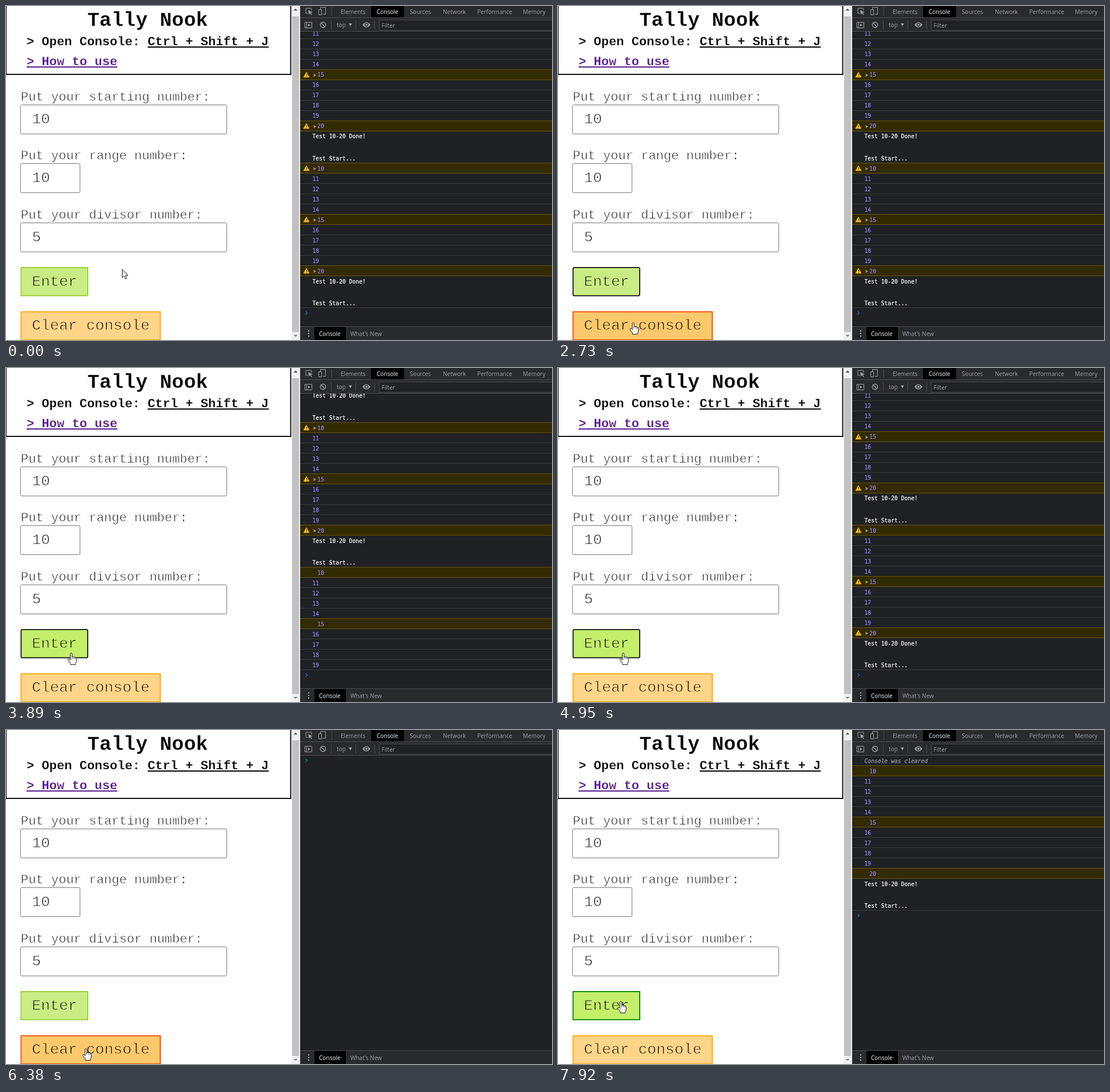
Write an HTML page that moves like this. It is 956 px wide and 586 px high and loops after 7990 ms.

```html
<!DOCTYPE html>
<html lang="en">
<head>
<meta charset="utf-8">
<title>Number test page</title>
<style>
  html, body { margin: 0; width: 100%; height: 100%; overflow: hidden; background: #fff; }
  svg { display: block; }
  text { white-space: pre; }
  .page { font-family: "Liberation Mono", "Courier New", monospace; }
  .ui { font: 10.1px "Open Sans", sans-serif; }
  .log { font: 9.7px "DejaVu Sans Mono", monospace; }
  rect { shape-rendering: crispEdges; }
  .round { shape-rendering: auto; }
</style>
</head>
<body>
<svg id="stage" width="956" height="586" viewBox="0 0 956 586">
  <clipPath id="view"><rect x="515" y="45" width="441" height="517"/></clipPath>
  <g id="fixed"></g>
  <g id="buttons" class="page"></g>
  <g id="console" class="log" clip-path="url(#view)"></g>
  <g id="pointer"></g>
</svg>
<script>
const LOOP = 7990, ROW = 18, MESSAGE = 56.4, TOP = 45, BOTTOM = 530.4;
const $ = id => document.getElementById(id);
const rect = (x, y, w, h, fill, more = '') =>
  `<rect x="${x}" y="${y}" width="${w}" height="${h}" fill="${fill}" ${more}/>`;
const text = (x, y, str, fill, more = '') =>
  `<text x="${x}" y="${y}" fill="${fill}" ${more}>${str}</text>`;
const path = (d, fill, more = '') => `<path d="${d}" fill="${fill}" ${more}/>`;
const stroke = (d, color, w = 1) => path(d, 'none', `stroke="${color}" stroke-width="${w}"`);
// A background-coloured outline slims the letters.
const slim = (size, back, w) => `font-size="${size}" stroke="${back}" stroke-width="${w}"`;

// ---- Still parts ----
function field(y, w, label, value) {
  return text(26, y - 7.5, label, '#111', slim(22.08, '#fff', .75)) +
    rect(25.5, y + .5, w, 51, '#fff', 'class="round" stroke="#767676" rx="2"') +
    text(45.5, y + 32.5, value, '#111', slim(26.45, '#fff', .9));
}

function page() {
  const bold = n => `${slim(n, '#fff', .3)} font-weight="700"`;
  return '<g class="page">' + rect(0, 0, 956, 586, '#fff') +
    rect(0, 0, 1, 121, '#111') + rect(497.5, 0, 2, 121, '#111', 'class="round"') +
    rect(0, 119, 499.5, 2, '#111', 'class="round"') +
    text(142.5, 35, 'Tally Nook', '#000', bold(35.2)) +
    text(36, 69, '&gt; Open Console: Ctrl + Shift + J', '#000', bold(22.08)) +
    rect(248, 71, 212, 2, '#000') +
    text(36, 104, '&gt; How to use', '#551a8b', bold(22.08)) +
    rect(36, 106, 159, 2, '#551a8b') +
    field(173, 361, 'Put your starting number:', '10') +
    field(276, 104, 'Put your range number:', '10') +
    field(380, 361, 'Put your divisor number:', '5') +
    rect(500, 0, 15, 586, '#f1f1f1') + rect(501, 18, 12, 554, '#c1c1c1') +
    path('M503.5 8L507 4.500L510.500 8z', '#505050') +
    path('M503.5 577L507 580.500L510.500 577z', '#808080') + '</g>';
}

function panel() {
  const grey = '#9aa0a6', line = '#494c50';
  const tabs = [[586, 'Elements'], [707, 'Sources'], [765, 'Network'],
    [825, 'Performance'], [905, 'Memory']];
  return '<g class="ui">' + rect(515, 0, 441, 586, '#202124') +
    rect(515, 0, 441, 45, '#292a2d') + rect(515, 20, 441, 1, line) + rect(515, 44, 441, 1, line) +
    rect(639, 0, 58, 20, '#000') + text(649, 13.5, 'Console', '#fff') +
    tabs.map(([x, name]) => text(x, 13.5, name, grey)).join('') +
    stroke('M529 13h-4v-9h10v4', grey) + path('M529 7l8 4l-3.500 1l2.500 3l-1 1l-2.500-3l-2 2z', grey) +
    stroke('M550.5 6v-3.500h9v12h-5M547.500 6.500h5v9h-5z', grey) +
    rect(570, 2, 1, 15, line) +
    stroke('M523.5 28.500h12v10h-12zM526.500 28.500v10', grey) + path('M529 31l4 2.500l-4 2.500z', grey) +
    `<circle cx="555" cy="33" r="4.7" fill="none" stroke="${grey}" stroke-width="1.4"/>` +
    stroke('M551.700 29.700l6.600 6.600', grey, 1.4) +
    rect(569, 25, 1, 16, line) + text(579, 37, 'top', grey) + path('M600 30.500h6l-3 5z', grey) +
    rect(612, 25, 1, 16, line) +
    path('M624 33q7-9 14 0q-7 9-14 0z', grey) +
    '<circle cx="631" cy="33" r="2.600" fill="#9aa0a6" stroke="#292a2d" stroke-width="1.300"/>' +
    rect(645, 25, 1, 16, line) +
    rect(653.5, 24.5, 310, 18, '#202124', `stroke="${line}"`) + text(657.5, 37.5, 'Filter', grey) +
    rect(515, 562, 441, 24, '#292a2d') + rect(515, 562, 441, 1, line) +
    [570, 574.5, 579].map(y => `<circle cx="530" cy="${y}" r="1.200" fill="${grey}"/>`).join('') +
    rect(540, 563, 55, 23, '#000') + text(548, 579, 'Console', '#fff') +
    text(603, 579, "What's New", grey) + '</g>';
}

// ---- Pointer: start, steps of 70 ms, end point ----
const HOME = [203.5, 462];
const MOVES = [
  [610, 10, 110, 476], [2030, 12, 132, 557], [2870, 7, 114, 500],
  [5420, 8, 140, 559], [7040, 6, 110, 476]
];
const PRESSES = [[3560, 3760], [4680, 4880], [6180, 6380], [7590, 7780]];

function pointerAt(t) {
  let [x, y] = HOME;
  for (const [start, steps, toX, toY] of MOVES) {
    if (t < start) break;
    const p = Math.min(1, (Math.floor((t - start) / 70) + 1) / steps);
    const e = p * p * (3 - 2 * p);
    x += (toX - x) * e;
    y += (toY - y) * e;
  }
  return [x, y];
}

const ARROW = 'M0 0V14.500L3.300 11.500L5.700 16.800L8 15.800L5.700 10.600H10z';
const HAND = 'M-1.500 1Q0-1 1.500 1V7Q3 5.700 4.500 7.300Q6 6.300 7 8Q9 7.300 9.300 9.500V14' +
  'Q9 17 7.500 18.500V20.500H-1V18.500L-5 13Q-6.500 11-5 10.300Q-3.500 10-1.500 12.500z';

function drawPointer(x, y, hand) {
  const shape = path(hand ? HAND : ARROW, '#fff', 'stroke="#111" stroke-linejoin="round"');
  const knuckles = hand ? stroke('M1.500 7v3.500M4.500 7.500v3M7 8.500v2.500', '#111', .8) : '';
  return `<g transform="translate(${x.toFixed(1)} ${y.toFixed(1)})">${shape}${knuckles}</g>`;
}

// ---- Buttons ----
const ENTER = { y: 458, w: 118.5, label: 'Enter', idle: ['#c9ed84', '#9acd32'],
  hover: ['#c4ef6b', '#008000'], active: ['#b6e64e', '#008000'] };
const CLEAR = { y: 535.6, w: 245.5, label: 'Clear console', idle: ['#ffd589', '#ffa500'],
  hover: ['#fbc96b', '#ff4500'], active: ['#f7bb48', '#ff4500'] };

const over = (b, x, y) => x >= 26 && x < 26 + b.w && y >= b.y && y < b.y + 51;

function button(b, hovered, pressed, ring) {
  const [fill, edge] = hovered ? (pressed ? b.active : b.hover) : b.idle;
  const frame = ring ? 'rx="2" stroke="#101010"' : `stroke="${edge}"`;
  return rect(26.4, b.y + .9, b.w - 1.8, 49.4, fill, `class="round" ${frame} stroke-width="1.8"`) +
    text(45.3, b.y + 32.7, b.label, '#111', slim(26.45, fill, .9));
}

// ---- Console: time, mode, new rows, icons and arrows on the new rows ----
const STATES = [
  [0, 'run', 0, 0, 0],
  [3890, 'run', 10, 0, 0], [3960, 'run', 12, 0, 0], [4030, 'run', 12, 2, 0], [4160, 'run', 0, 0, 0],
  [5080, 'run', 6, 0, 0], [5150, 'run', 12, 0, 0], [5370, 'run', 12, 1, 0],
  [5440, 'run', 12, 3, 0], [5510, 'run', 0, 0, 0],
  [6380, 'empty', 0, 0, 0], [6450, 'clear', 0, 0, 0], [7920, 'clear', 12, 0, 0]
];

function block(count, icons, arrows) {
  return Array.from({ length: count }, (_, i) => {
    const warn = i < 11 && i % 5 === 0, nth = i / 5;
    return { n: 10 + i, warn, done: i === 11, icon: nth < icons, arrow: nth < arrows };
  });
}

const logText = (x, y, str, fill, more = '') =>
  text(x, y.toFixed(1), str, fill, `stroke="${fill}" stroke-width=".2" ${more}`);

function drawRow(row, y) {
  const top = Math.round(y), base = y + 12.8;
  const violet = '#9980ff', rule = '#3a3b3e';
  if (row.done) return logText(536.5, base, 'Test 10-20 Done!', '#fff') +
    logText(536.5, y + 51, 'Test Start...', '#fff') +
    rect(515, Math.round(y + MESSAGE) - 1, 441, 1, rule);
  if (row.cleared) return logText(536.5, base, 'Console was cleared', '#9aa0a6', 'font-style="italic"') +
    rect(515, top + 17, 441, 1, rule);
  if (!row.warn) return logText(536.5, base, row.n, violet) + rect(515, top + 17, 441, 1, rule);
  const icon = `M526 ${top + 4}l5 9h-10z`;
  return rect(515, top - 1, 441, 19, '#332b00') +
    rect(515, top - 1, 441, 1, '#665500') + rect(515, top + 17, 441, 1, '#665500') +
    (row.icon ? path(icon, '#f4bd27', 'stroke="#f4bd27" stroke-width=".6" stroke-linejoin="round"') +
      rect(525.5, top + 7, 1, 3, '#332b00') + rect(525.5, top + 11, 1, 1, '#332b00') : '') +
    (row.arrow ? path(`M538.500 ${top + 6.5}l5 3l-5 3z`, '#8f8a78') : '') +
    logText(545.3, base, row.n, violet);
}

function drawConsole(t) {
  const [, mode, count, icons, arrows] = STATES.filter(s => s[0] <= t).pop();
  const full = block(12, 3, 3);
  const rows = [
    ...(mode === 'run' ? [...full, ...full, ...full] : mode === 'clear' ? [{ cleared: true }] : []),
    ...block(count, icons, arrows)
  ];
  const height = row => row.done ? MESSAGE : ROW;
  const total = rows.reduce((sum, row) => sum + height(row), 0);
  let y = Math.min(TOP, BOTTOM - total), out = '';
  for (const row of rows) {
    if (y > -MESSAGE) out += drawRow(row, y);
    y += height(row);
  }
  const tip = (y + 5.3).toFixed(1);
  return out + stroke(`M524.500 ${tip}l3 3l-3 3`, mode === 'empty' ? '#248a68' : '#2f6fe0', 1.2);
}

// ---- Loop ----
const shown = {};
function put(id, markup) {
  if (shown[id] !== markup) $(id).innerHTML = shown[id] = markup;
}

function draw(now) {
  const t = now % LOOP;
  const [x, y] = pointerAt(t);
  const onEnter = over(ENTER, x, y), onClear = over(CLEAR, x, y);
  const pressed = PRESSES.some(([a, b]) => t >= a && t < b);
  put('buttons', button(ENTER, onEnter, pressed, t >= 70 && t < 6180) +
    button(CLEAR, onClear, pressed, false));
  put('console', drawConsole(t));
  put('pointer', drawPointer(x, y, onEnter || onClear));
}

put('fixed', page() + panel());
let start;
function tick(now) {
  start ??= now;
  draw(now - start);
  requestAnimationFrame(tick);
}
draw(0);
requestAnimationFrame(tick);
</script>
</body>
</html>
```
